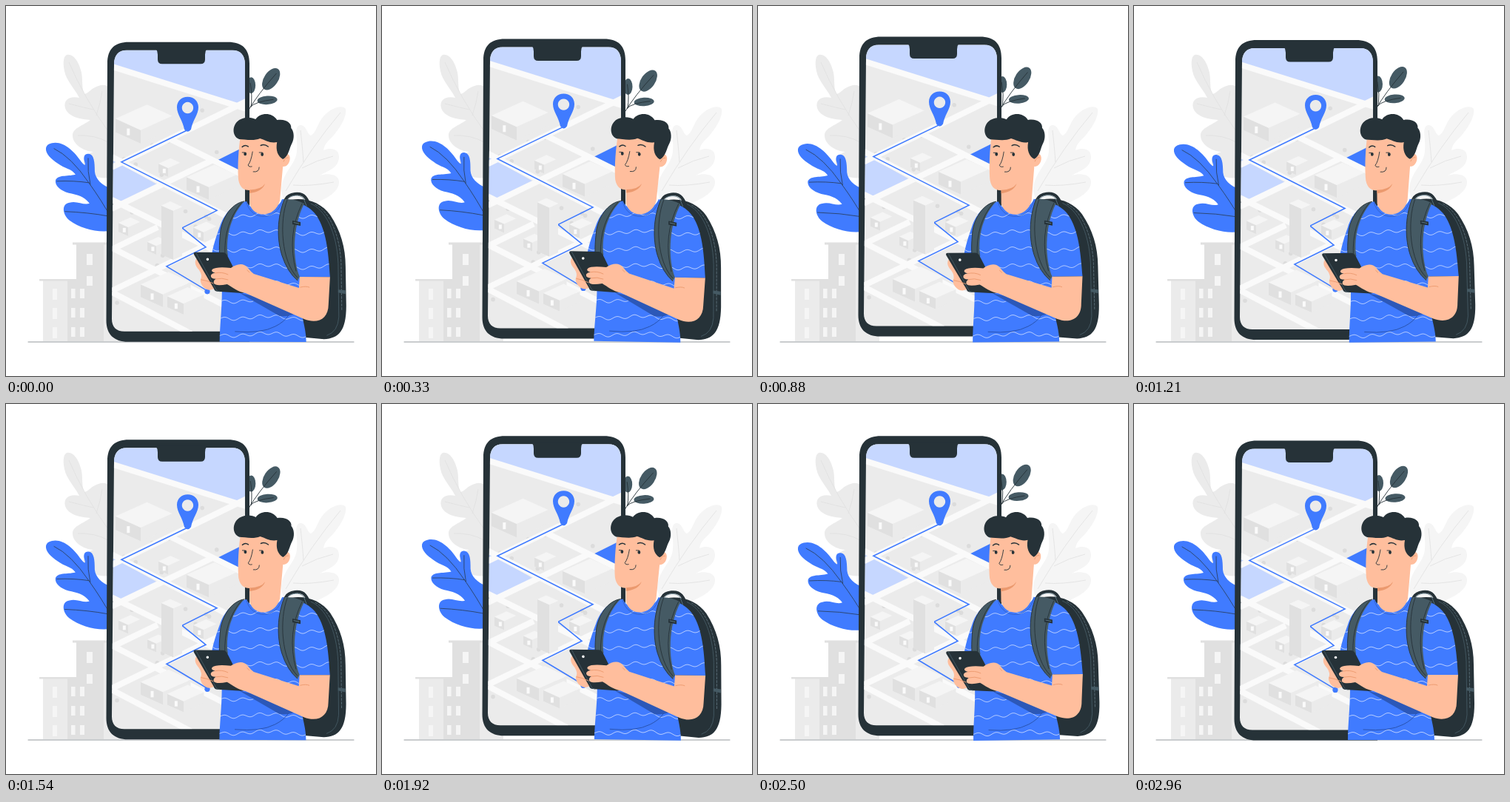
An HTML page that plays this animation: 500 by 500 pixels, repeating every 3 s.

```html
<!DOCTYPE html>
<html lang="en">
<head>
<meta charset="utf-8">
<title>Map navigation</title>
<style>
html, body { margin: 0; width: 100%; height: 100%; overflow: hidden; background: #fff }
svg { display: block; width: 100vw; height: 100vh }
.line { fill: none; stroke: #263238; stroke-width: .9; stroke-linecap: round; stroke-linejoin: round }
.blue { fill: #407bff }
.dark { fill: #263238 }
.slate { fill: #455a64 }
.skin { fill: #ffbe9d }
</style>
</head>
<body>
<svg viewBox="0 0 500 500">
<defs>
  <clipPath id="screen"><path id="screenShape" d="M146 79C146 67 152 60 163 60H306C317 60 323 67 323 79V440H160C149 440 143 434 143 423Z"/></clipPath>
  <clipPath id="shirt"><path id="shirtShape" d="M325 264C307 267 295 280 289 298C282 317 278 332 277 344L287 362L292 386C292 410 289 434 289 454H406C406 440 402 426 398 409V366H438C436 338 434 308 422 287C414 272 396 263 373 261C368 278 332 282 325 264Z"/></clipPath>
</defs>

<!-- grey foliage -->
<path fill="#ebebeb" d="M82 66C92 64 99 77 102 90C104 101 102 112 106 119C111 119 115 110 128 107Q136 106 142 112V232C125 234 112 229 107 220C102 210 107 200 118 197C104 196 91 187 90 176C89 165 104 162 114 154C101 153 84 150 80 138C77 127 86 121 99 124C92 110 82 102 79 88C77 79 77 68 82 66Z"/>
<path fill="#f5f5f5" d="M372 250C372 225 392 215 393 196C395 180 388 164 397 161C406 160 406 172 412 175C420 171 421 156 432 146C441 137 455 133 459 139C461 148 453 162 445 172C438 181 430 185 429 195C439 191 450 193 450 204C450 219 434 223 424 229C437 225 451 228 450 239C449 252 432 261 415 268L375 262Z"/>
<g fill="none" stroke="#e0e0e0" stroke-width=".8">
  <path d="M85 76Q106 125 140 172M85 132Q100 136 118 140M122 148Q128 130 130 115M97 175Q120 174 138 184"/>
  <path d="M452 144Q413 190 378 250M398 168Q401 195 402 211M442 203Q420 208 400 219M443 238Q410 244 388 242"/>
</g>

<!-- buildings -->
<path fill="#ebebeb" d="M130 322H164V453H130ZM50 371H84V453H50Z"/>
<path fill="#e0e0e0" d="M95 322H132V453H95ZM90 319.500H137V322.500H90ZM83 371H110V453H83ZM45 369H109V371.500H45Z"/>
<g id="windows" fill="#f5f5f5"></g>
<path class="line" style="stroke-width:.5" d="M30 454H470"/>

<!-- swaying plants -->
<g id="plants">
  <path class="blue" d="M62 185.500C77 182 92 196 102 211C107 217 108 216 106 210C104 203 107 199 112 200C119 201 120 211 120 224C121 234 129 242 142 247V304C124 307 101 301 86 290C77 283 74 268 86 266C96 263 105 270 113 267C106 257 95 255 85 253C74 250 66 243 67 236C70 228 82 231 94 228C89 220 79 220 70 213C61 207 53 200 54 192Q55 187 62 185.500Z"/>
  <path class="line" style="stroke-width:.7" d="M65 193Q88 204 112 239Q130 264 142 286M69 237Q92 236 112 239M111 206Q110 224 114 241M80 278Q110 279 138 284"/>
  <g class="slate">
    <ellipse cx="358" cy="98.500" rx="16.500" ry="9.500" transform="rotate(-56 358 98.500)"/>
    <ellipse cx="353" cy="127" rx="13.500" ry="5.800" transform="rotate(-4 353 127)"/>
    <ellipse cx="331" cy="107" rx="6" ry="11"/>
  </g>
  <path class="line" d="M328 140Q340 119 365 91M330 136Q337 129 361 126M331 136Q333 121 330 104"/>
</g>

<!-- large phone -->
<g id="phone">
  <path class="dark" d="M137 78C137 58 147 49 166 49H300C319 49 329 58 329 78V454H165C146 454 135.500 444 135.500 425Z"/>
  <use href="#screenShape" fill="#ebebeb"/>
  <g clip-path="url(#screen)">
    <path fill="#c6d7ff" d="M143 55H325V138L143 79ZM143 208L148 210L207 243L158 268L143 262Z"/>
    <path class="blue" d="M283 210L325 189V231Z"/>
    <g id="trees" fill="#dcdcdc"></g>
    <path fill="none" stroke="#fafafa" stroke-width="8" d="M143 82L325 139M143 218L325 129M143 204L325 298M222 180L325 231M143 274L280 208M143 262L325 352M143 329L205 299M143 385L325 297M143 327L325 420M143 387L250 443"/>
    <g id="houses"></g>
    <path fill="none" stroke="#407bff" stroke-width="1.600" d="M245 168L156 211L285 276.500L238 300L270 326L217 352L272 385"/>
    <use href="#tower"/>
  </g>
  <circle class="blue" cx="272" cy="386" r="3.600"/>
  <path class="blue" fill-rule="evenodd" d="M245.500 123C237 123 231 129 231 137C231 147 239 155 241 167Q245.500 173 250 167C252 155 260 147 260 137C260 129 254 123 245.500 123ZM245.500 130A7.700 7.700 0 1 1 245.400 130Z"/>
  <path class="dark" d="M202 57H272Q269 61 269 66V72.500Q269 78.500 263 78.500H211Q205 78.500 205 72.500V66Q205 61 202 57Z"/>
</g>

<!-- traveller -->
<g id="person">
  <path class="dark" d="M375 264C401 256 425 264 438 282C452 303 459 326 459 352L460 405C460 439 450 449 430 450L395 447Z"/>
  <path class="line" style="stroke:#455a64" d="M412 267C431 275 447 304 449 348L450 420Q449 440 434 445"/>
  <path class="line" style="stroke:#78909c;stroke-width:.6;stroke-dasharray:3 2" d="M418 268C437 278 451 308 453 348L454 412"/>
  <path class="slate" d="M449 383L459 384V389L449 387Z"/>
  <path class="line" style="stroke-width:4" d="M378 261C382 253 398 251 404 258Q409 264 410 271"/>
  <path class="line" style="stroke:#607d8b;stroke-width:.8" d="M381 261C385 255 397 254 402 260L406 270"/>

  <use href="#shirtShape" class="blue"/>
  <g clip-path="url(#shirt)">
    <path id="waves" fill="none" stroke="#d5e1ff" stroke-width=".8"/>
    <path fill="#2c58b8" d="M316 388L398 405V412Q385 421 370 419Z"/>
    <path class="line" style="stroke:#2750a8" d="M310 440Q345 443 364 433Q376 427 382 418M288 362L293 386"/>
  </g>

  <path class="skin" d="M316 180C313 203 313 224 314 235C316 246 322 249 329 249L329 267C335 288 364 286 370 263L374 217C383 218 387 202 380 200C376 198 374 202 372 204L371 179Q339 171 316 180Z"/>
  <path fill="#eb996e" d="M329 248.500Q345 248 350 240Q346 251 329 253Z"/>
  <path class="line" style="stroke:#2c58b8;stroke-width:.7" d="M325 266C332 292 367 290 373 263"/>
  <path class="dark" d="M315 180C304 176 305 158 317 153C325 149 333 151 337 153C343 144 359 143 366 154C378 152 386 158 385 165C389 169 390 179 386 186C383 191 382 203 374 207C367 203 364 195 366 184C357 186 350 181 343 179C334 183 322 180 315 180Z"/>
  <ellipse class="dark" cx="323" cy="200" rx="1.900" ry="2.400"/>
  <ellipse class="dark" cx="346" cy="200.500" rx="1.900" ry="2.400"/>
  <path class="line" style="stroke-width:1.500" d="M319 190.500Q323 187 327 190M344 188.500Q349 186 354 190"/>
  <path class="line" d="M319 198L322 198M342 198L346 198M333 197Q331 210 327 215Q328 218 332 217M334 224Q342 225 342 218"/>
  <path class="line" style="stroke:#eb996e" d="M375 210Q377 204 381 205"/>

  <path class="slate" d="M322 264C307 266 294 282 290 303C288 323 287 338 292 350L300 337C297 318 301 286 322 264Z"/>
  <path class="slate" d="M376 261C366 287 366 315 373 337Q380 359 394 371L397 366C388 344 386 300 403 267Q390 260 376 261Z"/>
  <path class="line" d="M322 264C307 266 294 282 290 303C288 323 287 338 292 350M318 266Q294 294 296 337M376 261C366 287 366 315 373 337Q380 359 394 371M380 262C369 291 372 345 394 367M400 267Q379 310 392 358"/>
  <path class="dark" d="M387 290L398 292L398 297L387 295Z"/>
  <path class="line" style="stroke:#607d8b" d="M389 292.500L396 294"/>

  <path class="skin" d="M257 342C254 348 257 352 261 357Q266 364 263 370C262 375 268 384 276 384L290 380L280 352Z"/>
  <path class="dark" d="M256 333H293Q297 333 299 337L323 384Q323 388 319 388L286 386Q282 386 281 382L254 336Q253 333 256 333Z"/>
  <path class="line" style="stroke:#455a64" d="M257 334L284 383Q285 386 289 386"/>
  <circle cx="272.500" cy="342.500" r="1.800" fill="#fff"/>
  <path class="skin" d="M397 366H438L436 403C436 423 421 430 403 423L324 388C313 386 306 380 299 376Q284 379 281 375Q280 371 284 369Q276 369 277 364Q279 361 283 361Q276 359 279 356Q284 352 304 354C311 349 321 346 327 354Q331 359 335 362L396 381Z"/>
  <path class="line" style="stroke:#eb996e" d="M283 361Q292 359 300 363M284 369Q292 367 300 370M264 370Q272 371 280 375M326 357L329 360M398 380Q406 378 410 380"/>
</g>
</svg>
<script>
const get = id => document.getElementById(id);
const rect = (x, y, w, h) => `<rect x="${x}" y="${y}" width="${w}" height="${h}"/>`;
const slope = .45;

// isometric block standing on its front corner (x, y)
function block(x, y, left, right, h, id = '') {
  const lx = x - left, ly = y - left * slope, rx = x + right, ry = y - right * slope, top = y - h;
  return `<g id="${id}">
    <path fill="#e0e0e0" d="M${x} ${y}L${lx} ${ly}V${ly - h}L${x} ${top}Z"/>
    <path fill="#ebebeb" d="M${x} ${y}L${rx} ${ry}V${ry - h}L${x} ${top}Z"/>
    <path fill="#f5f5f5" d="M${x} ${top}L${lx} ${ly - h}L${rx - left} ${ry - left * slope - h}L${rx} ${ry - h}Z"/></g>`;
}

function house(x, y, size) {
  const h = 8 + size * .3, dx = size * .55;
  return block(x, y, size, size * 1.25, h) +
    `<g fill="#fafafa">${rect(x - dx, y - dx * slope - h * .65, 4, h * .5)}</g>`;
}

get('houses').innerHTML = house(182, 186, 34) + house(219, 231, 13) + house(274, 262, 30) +
  house(165, 311, 13) + house(203, 336, 12) + house(267, 318, 14) +
  house(212, 407, 30) + house(240, 417, 22) + block(226, 343, 16, 12, 66, 'tower');

let seed = 7;
const random = () => (seed = seed * 16807 % 2147483647) / 2147483647;
let trees = '';
for (let i = 0; i < 26; i++)
  trees += `<circle cx="${150 + 165 * random()}" cy="${125 + 300 * random()}" r="2.800"/>`;
get('trees').innerHTML = trees;

let windows = rect(109, 335, 8, 15) + rect(109, 365, 8, 13);
for (let y = 382; y < 440; y += 26)
  windows += rect(63, y, 6, 15) + rect(88, y, 5.500, 13) + rect(100, y, 6, 13);
get('windows').innerHTML = windows;

let waves = '';
for (let y = 283; y < 450; y += 23)
  for (let x = 270; x <= 440; x += 2)
    waves += `${x == 270 ? 'M' : 'L'}${x} ${y + 2 * Math.sin(x / 3.700) + 2 * Math.sin(x / 15)}`;
get('waves').setAttribute('d', waves);

// 24 steps a second; both cycles take 36 steps
function draw() {
  const step = Math.floor(performance.now() * .024 + .1) + 1;
  const p = step % 36 / 36;
  const sway = p < .25 ? 4 * p : p < .75 ? 2 - 4 * p : 4 * p - 4;
  const lift = 10 * (1 - Math.abs(2 * p - 1));
  get('phone').setAttribute('transform', `translate(0 ${.4 - lift})`);
  get('plants').setAttribute('transform', `rotate(${sway} 212 195)`);
  get('person').setAttribute('transform', `rotate(${sway} 356 300)`);
  requestAnimationFrame(draw);
}
draw();
</script>
</body>
</html>
```
